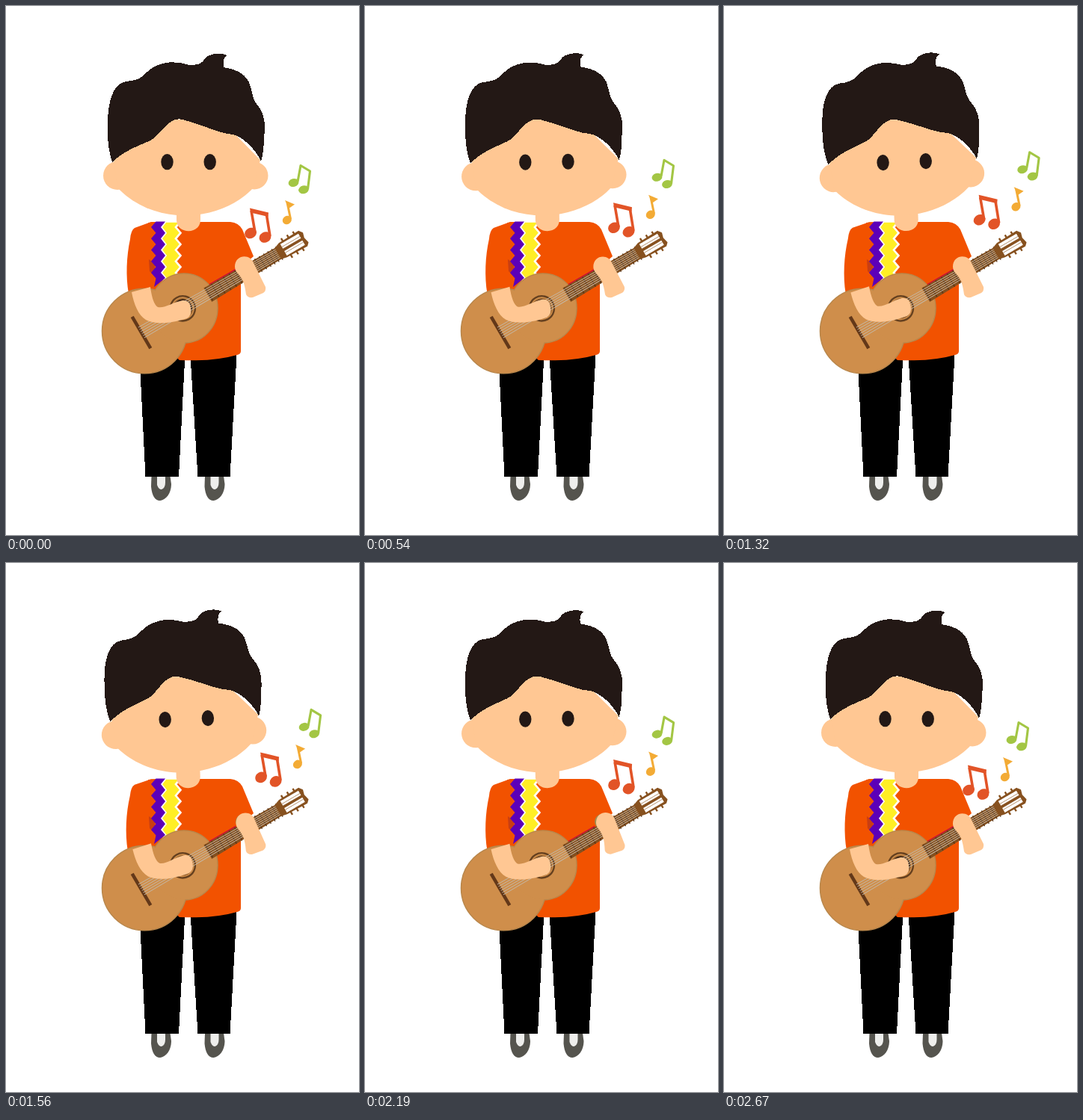
An HTML page for the animation above (2700 ms loop, 472 by 708 pixels).

```html
<!DOCTYPE html>
<html lang="en">
<head>
<meta charset="utf-8">
<title>Guitar player</title>
<style>
html, body { margin: 0; width: 100%; height: 100%; overflow: hidden; background: #fff; }
svg { display: block; width: 100%; height: 100%; }
.skin { fill: #ffc793; }
.dark { fill: #231815; }
.shirt { fill: #f25200; }
.crisp { shape-rendering: crispEdges; }
</style>
</head>
<body>
<svg viewBox="0 0 472 708">
  <defs>
    <g id="shoe">
      <path fill="#55544e" d="M194.500 629L194 643C195 655 199 662 206 662C214 661 221 652 221 640L219.500 629Z"/>
      <path fill="#eeeeec" d="M202 629L202 641Q204 647 208 647Q213 645 213 638L213 629Z"/>
    </g>
  </defs>

  <use href="#shoe"/>
  <use href="#shoe" x="71.5"/>
  <path class="crisp" d="M178 460H240L239 475L231 630H186.500Z M246 460H308.500V467L299.500 630H256.500Z"/>

  <path class="shirt" d="M190 290L205 289H300Q311 290 316 299L331 335L314 350V462Q314 466 309 467Q278 476 232 474L192 440Z"/>
  <path id="sleeve" class="shirt" d="M205 289L194 289L172 297Q167 300 166 312C161 335 160 362 164 385Q180 384 196 376L212 340Z"/>
  <path fill="#c93e12" d="M191 339L199 345V362L192 355Z"/>
  <path id="yellow" fill="#ffee25" stroke="#fff" stroke-width="2.6"/>
  <path id="purple" fill="#5c00b8"/>

  <path d="M268 377L308 354" stroke="#cf1134" stroke-width="5"/>
  <g fill="#cf8e4b" stroke="#b9874b" stroke-width="1.5">
    <ellipse cx="238" cy="404.5" rx="45" ry="46.5"/>
    <circle cx="185.3" cy="435" r="56.8"/>
  </g>
  <ellipse cx="238" cy="404.5" rx="44.3" ry="45.8" fill="#cf8e4b"/>
  <g transform="translate(181 437) rotate(-30.2)">
    <circle cx="64" cy="0" r="16.6" fill="#cf8e4b" stroke="#65401f" stroke-width="2.4"/>
    <circle cx="64" cy="0" r="13" fill="#2c1b11" stroke="#93612f" stroke-width="1.5"/>
    <path d="M0 -24.5V24.5" stroke="#633819" stroke-width="4.5"/>
    <path fill="#84501f" d="M102 -9.5L215 -8V9L102 12Z"/>
    <path id="frets" stroke="#593416" stroke-width="1.3"/>
    <path id="strings" stroke="#c5b8a6" stroke-width="0.9"/>
    <path fill="#87511f" d="M211 -8L219 -11L250 -12L254 -7L252 0L254 8L250 12L219 11L211 9Z"/>
    <path d="M220 -5.3H248M220 5.3H248" stroke="#fff" stroke-width="7"/>
    <path id="pegs" stroke="#87511f" stroke-width="2.4"/>
    <path d="M220 -4.5H248M220 4.5H248" stroke="#b08a62" stroke-width="0.8"/>
  </g>

  <path class="skin" id="arm" d="M168 383C171 399 177 414 187 420C203 428 227 423 242 418Q249 414 247 404Q246 393 236 394C222 397 212 405 203 403Q196 399 193 376Z"/>
  <ellipse cx="317" cy="346" rx="10" ry="10" fill="#a18d52"/>
  <path class="skin" id="hand" d="M306 349C306 332 327 331 331 344L347 376Q348 381 344 384L330 390Q323 391 321 386C319 370 316 365 311 359Q306 354 306 349Z"/>

  <g id="head">
    <path class="skin" d="M228 270V287C229 306 259 306 260 287V270Z"/>
    <circle class="skin" cx="149" cy="227" r="19"/>
    <circle class="skin" cx="332" cy="227" r="18.5"/>
    <path class="skin" d="M200 150L144 206L149 243C172 268 206 280.500 239 280.500C275 280.500 310 266 331 243L340 206L290 155Z"/>
    <path class="dark crisp" d="M142 209C137 195 135 174 136 158C136 128 143 104 160 101C184 99 180 93 197 82C216 72 231 75 245 79C267 79 262 71 270 67Q283 61 296 66Q289 70 291 82C306 85 317 88 325 102C330 115 329 124 335 131C347 144 347 161 345 176Q345 194 341 208C334 192 317 175 303 172C286 171 266 160 236 152C221 148 211 164 200 175C192 184 165 187 142 209Z"/>
    <ellipse class="dark" cx="215.5" cy="208.7" rx="8.2" ry="10.6"/>
    <ellipse class="dark" cx="272.7" cy="208.7" rx="8.2" ry="10.6"/>
  </g>

  <g id="notes" stroke-linejoin="round">
    <g fill="#e25427" stroke="#e25427">
      <ellipse cx="327" cy="304" rx="8.2" ry="7" transform="rotate(-30 327 304)" stroke="none"/>
      <ellipse cx="346.5" cy="309.5" rx="8.2" ry="7" transform="rotate(-30 346.5 309.5)" stroke="none"/>
      <path fill="none" stroke-width="3.6" d="M333 303L328 274M353 308L348.500 280"/>
      <path stroke="none" d="M326 270.500L351 276.500L350.500 282L327 276.500Z"/>
    </g>
    <g fill="#a3c644" stroke="#a3c644">
      <ellipse cx="384.5" cy="236.5" rx="7" ry="5.4" transform="rotate(-15 384.500 236.500)" stroke="none"/>
      <ellipse cx="398" cy="245.800" rx="7" ry="5.4" transform="rotate(-15 398 245.800)" stroke="none"/>
      <path fill="none" stroke-width="3.1" d="M390 235L394 213.500L406.500 221L403.500 245"/>
    </g>
    <g fill="#f3ab35" stroke="#f3ab35">
      <ellipse cx="375.8" cy="286.5" rx="6.3" ry="5.5" transform="rotate(-35 375.800 286.500)" stroke="none"/>
      <path fill="none" stroke-width="3" d="M380.500 285L376 263"/>
      <path stroke="none" d="M373 260L386 265.500L378 271Z"/>
    </g>
  </g>
</svg>
<script>
const $ = id => document.getElementById(id);
const LOOP = 2700, STEP = 30;

// Zigzag edge running down the chest; all edges lean the same way
function zigzag(right, left, rows) {
  return Array.from({ length: rows }, (_, i) => [i % 2 ? left : right, 288.5 + i * 7.6]);
}
const band = (left, right) => 'M' + left.concat(right.reverse()).join('L') + 'Z';
$('yellow').setAttribute('d', band(zigzag(213.5, 207.5, 12), zigzag(233.5, 227, 12)));
$('purple').setAttribute('d', band(
  zigzag(200.5, 194, 11).concat([[198, 376]]),
  zigzag(213, 207, 10).concat([[213, 364]])));

let frets = '', strings = '', pegs = '';
for (let i = 0, x = 104; i < 15; i++, x += 10 - i * 0.3) frets += `M${x} -9V11`;
for (let i = 0; i < 6; i++) strings += `M0 ${-8 + i * 3.2}L220 ${-5.5 + i * 2.4}`;
for (const x of [225, 234, 243]) pegs += `M${x} -15V-9M${x} 9V15`;
$('frets').setAttribute('d', frets);
$('strings').setAttribute('d', strings);
$('pegs').setAttribute('d', pegs);

// Linear interpolation through [time, value] keys
function track(keys, t) {
  const i = keys.findIndex(k => k[0] >= t);
  if (i < 0) return keys[keys.length - 1][1];
  if (i === 0) return keys[0][1];
  const [t0, a] = keys[i - 1], [t1, b] = keys[i];
  return a + (b - a) * (t - t0) / (t1 - t0);
}
const SWAY = [[0, 0], [1425, 1], [2670, 0]];
const GRIP = [[0, 0], [900, -2], [1320, 0], [1800, 5], [2190, 5], [2670, 0]];

const move = (id, value) => $(id).setAttribute('transform', value);

function draw(t) {
  const s = track(SWAY, t);
  move('notes', `translate(${15.8 * s} ${-19.2 * s})`);
  move('head', `rotate(${-2.1 * s} 240 295)`);
  move('arm', `translate(${1.5 * s} 0) rotate(${-3 * s} 176 383)`);
  move('sleeve', `rotate(${0.9 * s} 185 295)`);
  move('hand', `rotate(${track(GRIP, t)} 334 382)`);
}

const start = performance.now();
function tick() {
  const t = (performance.now() - start) % LOOP;
  draw(Math.floor(t / STEP) * STEP);
  requestAnimationFrame(tick);
}
draw(0);
requestAnimationFrame(tick);
</script>
</body>
</html>
```
